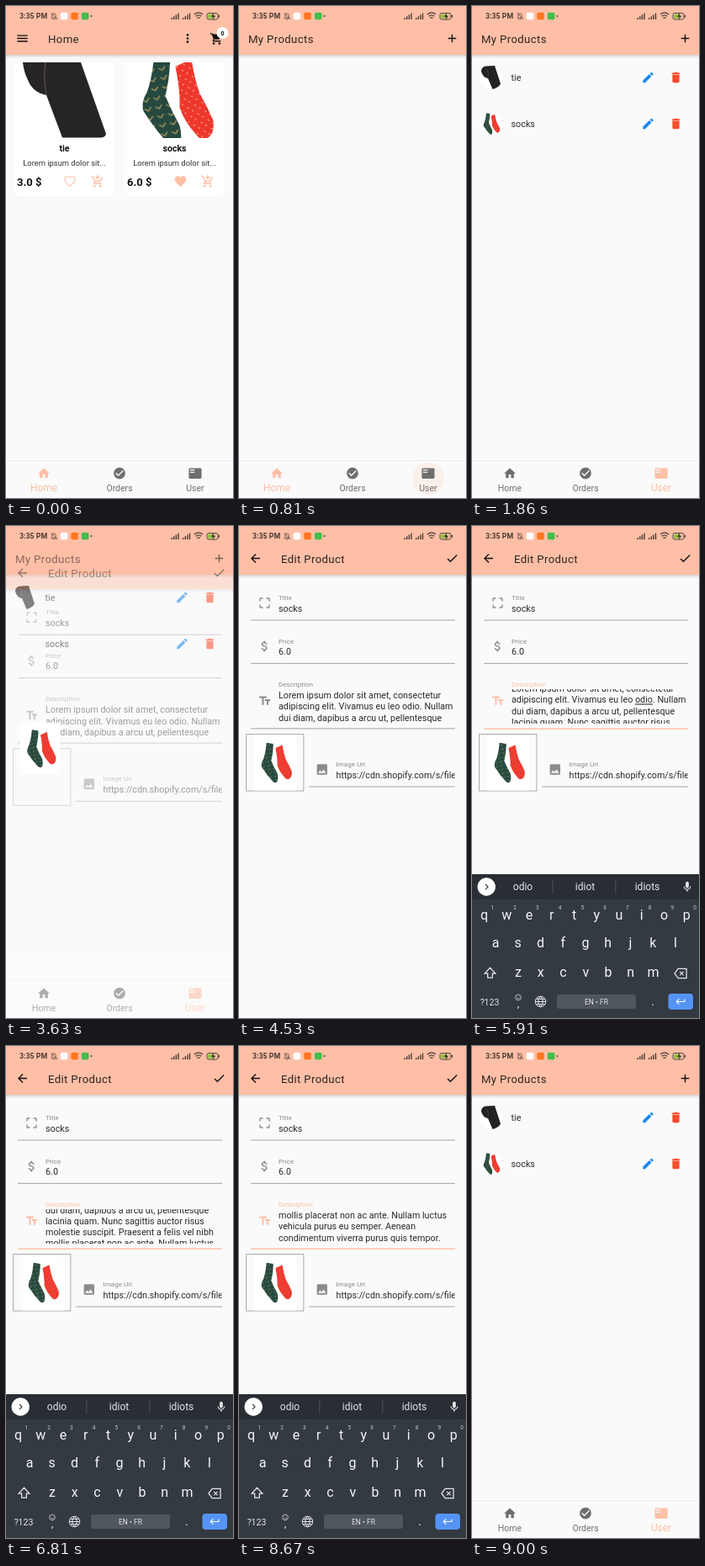
Write an HTML page that moves like this. It is 270x585 px and loops after 9240 ms.

```html
<!DOCTYPE html>
<html lang="en">
<head>
<meta charset="utf-8">
<title>Shop app</title>
<style>
html, body { margin: 0; width: 100%; height: 100%; overflow: hidden; background: #fafafa; }
#stage { display: block; width: 100vw; height: 100vh; font-family: Roboto, sans-serif; }
text { white-space: pre; }
</style>
</head>
<body>
<svg id="stage" viewBox="0 0 270 585"></svg>
<script>
const LOOP = 9240, PEACH = '#ffbfa6', GREY = '#6e6e6e', SOFT = '#8c8c8c', INK = '#2a2a2a', PALE = '#e4e6e8', STATUS = '#4a3b35';
const $ = id => document.getElementById(id);

// Icon outlines on a 24-unit grid
const ICONS = {
  menu: 'M3 18h18v-2H3zm0-5h18v-2H3zm0-7v2h18V6z',
  more: 'M12 8a2 2 0 1 0 0-4 2 2 0 0 0 0 4zm0 2a2 2 0 1 0 0 4 2 2 0 0 0 0-4zm0 6a2 2 0 1 0 0 4 2 2 0 0 0 0-4z',
  cart: 'M7 18a2 2 0 1 0 0 4 2 2 0 0 0 0-4zM1 2v2h2l3.6 7.59-1.35 2.45C4.5 15.4 5.5 17 7 17h12v-2H7.42c-.2 0-.3-.2-.22-.37L8.1 13h7.45c.75 0 1.41-.41 1.75-1.03l3.58-6.49A1 1 0 0 0 20 4H5.21l-.94-2zm16 16a2 2 0 1 0 0 4 2 2 0 0 0 0-4z',
  addCart: 'M11 9h2V6h3V4h-3V1h-2v3H8v2h3zm-4 9a2 2 0 1 0 0 4 2 2 0 0 0 0-4zm10 0a2 2 0 1 0 0 4 2 2 0 0 0 0-4zm-9.8-3.37L8.1 13h7.45c.75 0 1.41-.41 1.75-1.03l3.86-7.01L19.42 4l-3.87 7H8.53L4.27 2H1v2h2l3.6 7.59-1.35 2.45C4.5 15.4 5.5 17 7 17h12v-2H7.42c-.2 0-.3-.2-.22-.37z',
  heart: 'M12 21.35l-1.45-1.32C5.4 15.36 2 12.28 2 8.5 2 5.42 4.42 3 7.5 3c1.74 0 3.41.81 4.5 2.09C13.09 3.81 14.76 3 16.5 3 19.58 3 22 5.42 22 8.5c0 3.78-3.4 6.86-8.55 11.54z',
  home: 'M10 20v-6h4v6h5v-8h3L12 3 2 12h3v8z',
  done: 'M12 2a10 10 0 1 0 0 20 10 10 0 0 0 0-20zm-2 15l-5-5 1.41-1.41L10 14.17l7.59-7.59L19 8z',
  list: 'M21 3H3a2 2 0 0 0-2 2v14c0 1.1.9 2 2 2h18a2 2 0 0 0 2-2V5a2 2 0 0 0-2-2zm-10 8H3V9h8zm0-4H3V5h8z',
  edit: 'M3 17.25V21h3.75L17.81 9.94l-3.75-3.75zM20.71 7.04a1 1 0 0 0 0-1.41l-2.34-2.34a1 1 0 0 0-1.41 0l-1.83 1.83 3.75 3.75z',
  trash: 'M6 19c0 1.1.9 2 2 2h8a2 2 0 0 0 2-2V7H6zM19 4h-3.5l-1-1h-5l-1 1H5v2h14z',
  add: 'M19 13h-6v6h-2v-6H5v-2h6V5h2v6h6z',
  back: 'M20 11H7.83l5.59-5.59L12 4l-8 8 8 8 1.41-1.41L7.83 13H20z',
  check: 'M9 16.17L4.83 12l-1.42 1.41L9 19 21 7l-1.41-1.41z',
  frame: 'M3 5v4h2V5h4V3H5a2 2 0 0 0-2 2zm2 10H3v4c0 1.1.9 2 2 2h4v-2H5zm14 4h-4v2h4a2 2 0 0 0 2-2v-4h-2zm0-16h-4v2h4v4h2V5a2 2 0 0 0-2-2z',
  dollar: 'M11.8 10.9c-2.27-.59-3-1.2-3-2.15 0-1.09 1.01-1.85 2.7-1.85 1.78 0 2.44.85 2.5 2.1h2.21c-.07-1.72-1.12-3.3-3.21-3.81V3h-3v2.16c-1.94.42-3.5 1.68-3.5 3.61 0 2.31 1.91 3.46 4.7 4.13 2.5.6 3 1.48 3 2.41 0 .69-.49 1.79-2.7 1.79-2.06 0-2.87-.92-2.98-2.1h-2.2c.12 2.19 1.76 3.42 3.68 3.83V21h3v-2.15c1.95-.37 3.5-1.5 3.5-3.55 0-2.84-2.43-3.81-4.7-4.4z',
  type: 'M2.5 4v3h5v12h3V7h5V4zm19 5h-9v3h3v7h3v-7h3z',
  image: 'M21 19V5a2 2 0 0 0-2-2H5a2 2 0 0 0-2 2v14c0 1.1.9 2 2 2h14a2 2 0 0 0 2-2zM8.5 13.5l2.5 3.01L14.5 12l4.5 6H5z',
  left: 'M15.41 7.41L14 6l-6 6 6 6 1.41-1.41L10.83 12z',
  right: 'M10 6L8.59 7.41 13.17 12l-4.58 4.59L10 18l6-6z',
  mic: 'M12 14a3 3 0 0 0 3-3V5a3 3 0 0 0-6 0v6a3 3 0 0 0 3 3zm5.3-3c0 3-2.54 5.1-5.3 5.1S6.7 14 6.7 11H5c0 3.41 2.72 6.23 6 6.72V21h2v-3.28c3.28-.48 6-3.3 6-6.72z',
  enter: 'M19 7v4H5.83l3.58-3.59L8 6l-6 6 6 6 1.41-1.41L5.83 13H21V7z',
  shift: 'M12 3L3 13h5v7h8v-7h5z',
  erase: 'M22 4H8L2 12l6 8h14zM11 9l6 6m0-6l-6 6',
  globe: 'M2 12a10 10 0 1 0 20 0 10 10 0 1 0-20 0h20M12 2q-9 10 0 20 9-10 0-20M4 7h16M4 17h16',
  clip: 'M4 4h16v17H4zM9 2h6v4H9zM8 10h8M8 14h8M8 18h5',
  sticker: 'M4 3h16v12l-6 6H4zM20 15h-6v6M8 8v2m7-2v2M8 13q4 4 7 0',
  smile: 'M3 12a9 9 0 1 0 18 0 9 9 0 1 0-18 0M8 9v1m8-1v1M8 14q4 4 8 0',
  bell: 'M5 18h14l-2-3V10q0-5-5-5t-5 5v5zM10 21h4M4 3l17 18'
};
const place = (x, y, size) => `transform="translate(${x - size / 2} ${y - size / 2}) scale(${size / 24})"`;
const icon = (name, x, y, fill, size = 16.5) => `<path d="${ICONS[name]}" fill="${fill}" ${place(x, y, size)}/>`;
const line = (name, x, y, color, size = 16.5, w = 2) =>
  `<path d="${ICONS[name]}" fill="none" stroke="${color}" stroke-width="${w}" ${place(x, y, size)}/>`;
const rect = (x, y, w, h, fill, more = '') => `<rect x="${x}" y="${y}" width="${w}" height="${h}" fill="${fill}" ${more}/>`;
const dot = (x, y, r, fill) => `<circle cx="${x}" cy="${y}" r="${r}" fill="${fill}"/>`;
const text = (x, y, s, size, fill = INK, more = '') => `<text x="${x}" y="${y}" font-size="${size}" fill="${fill}" ${more}>${s}</text>`;
const MID = 'text-anchor="middle"', BOLD = 'font-weight="700"';

const bar = (title, x) => rect(0, 58, 270, 5, 'url(#shade)') + rect(0, 0, 270, 58, PEACH) +
  text(x, 43.6, title, 13.2, '#2b2522', 'letter-spacing=".35"');
const socks = (x, y, w, h, more = '') =>
  `<svg x="${x}" y="${y}" width="${w}" height="${h}" viewBox="-59.5 -78.5 119 157" preserveAspectRatio="xMidYMid slice" ${more}>
  ${rect(-60, -200, 120, 400, '#fff')}<use href="#socks"/></svg>`;

const defs = `<defs>
<linearGradient id="shade" x2="0" y2="1"><stop stop-opacity=".16"/><stop offset=".5" stop-opacity=".05"/><stop offset="1" stop-opacity="0"/></linearGradient>
<pattern id="birds" width="13" height="11" patternUnits="userSpaceOnUse" patternTransform="rotate(-12)">
${rect(0, 0, 13, 11, '#25493f')}<path d="M2 3l4 3 4-4" fill="none" stroke="#a8945a" stroke-width="1.4"/></pattern>
<pattern id="specks" width="9" height="11" patternUnits="userSpaceOnUse" patternTransform="rotate(-20)">
${rect(0, 0, 9, 11, '#ee372c')}<path d="M2 2l2 2M7 7v2" stroke="#f6cfc0"/></pattern>
<g id="socks"><path fill="url(#birds)" d="M-24-55L-5-52Q-6-24-11-5-4 12 6 30 10 46 5 54-3 58-8 51-23 35-37 13-40 2-33-9-27-24-24-55Z"/>
<path fill="url(#specks)" d="M1-40L20-49Q24-24 30-8 39 8 46 24 48 40 39 45 31 49 25 40 12 26 6 9 7-10 1-40Z"/></g>
<clipPath id="disc"><circle cx="22.5" cy="140" r="13.75"/></clipPath>
</defs>`;

const card = (x, name, price, picture, heart) =>
  rect(x, 67.8, 119, 160, '#000', 'rx="7" opacity=".035"') + rect(x, 67, 119, 160, '#fff', 'rx="7"') + picture +
  text(x + 59.5, 172.8, name, 10.6, '#111', MID + BOLD) +
  text(x + 59.5, 190, 'Lorem ipsum dolor sit...', 9.4, '#333', MID) +
  text(x + 3, 213.7, price, 13, '#111', BOLD) + heart + icon('addCart', x + 98.8, 208.5, PEACH);

const tie = `<path fill="#272425" d="M20 67H89L119 152Q118 156.500 112 156.500H67L48 106Q32 103 26 88 21 78 20 67Z"/>
<path fill="none" stroke="#625d5d" d="M47 67Q44 86 48 106"/>`;

const homePage = bar('Home', 50) + icon('menu', 19.5, 38.5, '#111') + icon('more', 216, 38.5, '#111') +
  icon('cart', 250.5, 39, '#111') + dot(257.5, 32, 7, '#fff') + text(257.5, 34.6, '0', 7, '#111', MID + BOLD) +
  card(10, 'tie', '3.0 $', tie, line('heart', 76, 208.5, PEACH, 15.2, 1.8)) +
  card(141, 'socks', '6.0 $', socks(141, 67, 119, 90), icon('heart', 207.5, 208.5, PEACH));

const row = (y, name) => text(46.5, y + 4, name, 10.8) + icon('edit', 209.5, y, '#1689ee') + icon('trash', 242.5, y, '#fb4b2d');
const listPage = bar('My Products', 11) + icon('add', 253.5, 38.5, '#111') +
  `<path id="spinner" fill="none" stroke="${PEACH}" stroke-width="2.75"/>
  <g id="rows">${row(85, 'tie')}${row(140, 'socks')}</g>
  <g id="thumbs">${dot(22.5, 85, 13.75, '#fff')}
  <path fill="#232121" d="M11 78Q11 72 17 71.500L27 71 34 92.500Q32 96.500 24.500 99L19 86Q13 85 11 78Z"/>
  <path d="M16 74q4 3 3 9" fill="none" stroke="#555" stroke-width=".6"/></g>
  <g id="thumb" clip-path="url(#disc)">${socks(8.75, 126.25, 27.5, 27.5)}</g>`;

const words = ['Lorem ipsum dolor sit amet, consectetur',
  'adipiscing elit. Vivamus eu leo <tspan id="odio">odio</tspan>. Nullam',
  'dui diam, dapibus a arcu ut, pellentesque', 'lacinia quam. Nunc sagittis auctor risus',
  'molestie suscipit. Praesent a felis vel nibh', 'mollis placerat non ac ante. Nullam luctus',
  'vehicula purus eu semper. Aenean', 'condimentum viverra purus quis tempor.'];
const label = (x, y, s, fill = SOFT) => text(x, y, s, 8.1, fill);
const rule = (x, y) => rect(x, y - .4, 257 - x, .8, '#8f8f8f');

const editPage = rect(0, 0, 270, 585, '#fafafa') + bar('Edit Product', 50) +
  icon('back', 19.5, 38.5, '#111') + icon('check', 253.5, 38.5, '#111') +
  icon('frame', 30.5, 91.5, SOFT) + label(47, 88.3, 'Title') + text(47, 101.8, 'socks', 10.75) + rule(14, 112) +
  icon('dollar', 30.5, 143, SOFT) + label(47, 139.5, 'Price') + text(47, 153, '6.0', 10.75) + rule(14, 163.3) +
  `<g id="focus">${icon('type', 30.5, 208, 'inherit')}${label(47, 191.3, 'Description', 'inherit')}
  <rect id="focusRule" x="14" y="240.5" width="243"/></g>
  <svg x="47" y="194" width="210" height="41" viewBox="47 194 210 41"><g id="scroll">
  ${words.map((s, i) => text(47, 205.3 + i * 13.1, s, 10.75)).join('')}${rect(203.3, 207.5, 1.4, 13.5, '#3a7fc4', 'id="caret"')}</g></svg>
  <path id="handle" fill="#58a9f6" d="M203.7 219.8l5.3 5.4a7.5 7.5 0 1 1-10.6 0z"/>` +
  rect(8.6, 247.5, 68.3, 67.5, 'none', 'stroke="#999" stroke-width=".8"') +
  icon('image', 98.8, 289.5, SOFT) + label(115.5, 286, 'Image Url') + rule(83, 310) +
  `<svg x="115" y="284" width="141.5" height="22" viewBox="115 284 141.5 22">${text(115.5, 299.8, 'https://cdn.shopify.com/s/files/', 10.75)}</svg>`;

const keys = (s, x, y) => [...s].map((c, i) => text(x + i * 26.75, y, c, 16, '#f4f5f6', MID)).join('');
const keyboard = rect(0, 414, 270, 172, '#343a42') + rect(0, 414, 270, 30, '#292e35') +
  dot(17.2, 429, 10.7, '#fff') + icon('mic', 256, 429, PALE, 15) +
  `<g id="tools">${icon('left', 17, 429, '#333', 14)}${line('sticker', 53, 429, PALE, 13)}
  ${text(91, 432.6, 'GIF', 9.5, PALE, MID + BOLD)}${line('clip', 130.5, 429, PALE, 13)}
  <g fill="none" stroke="${PALE}"><circle cx="169" cy="429" r="3.3" stroke-width="2"/>
  <circle cx="169" cy="429" r="5" stroke-width="1.8" stroke-dasharray="1.96"/></g>
  ${rect(193.5, 422, .8, 14, '#555b63')}<g transform="rotate(90 217 429)">${icon('more', 217, 429, PALE, 15)}</g></g>
  <g id="hints">${icon('right', 17.5, 429, '#333', 14)}${rect(95.5, 421, .8, 16, '#555b63')}${rect(170.5, 421, .8, 16, '#555b63')}
  ${['odio', 'idiot', 'idiots'].map((s, i) => text(60.5 + i * 74, 433.2, s, 12, PALE, MID)).join('')}</g>` +
  keys('qwertyuiop', 14.5, 467.5) + keys('asdfghjkl', 28, 501.3) + keys('zxcvbnm', 55, 535.5) +
  [...'1234567890'].map((c, i) => text(24.3 + i * 26.75, 455.5, c, 6.5, '#c4c8cc', MID)).join('') +
  line('shift', 21.5, 531.5, PALE, 17, 1.8) + line('erase', 248, 532, PALE, 17, 1.8) +
  text(21, 569.5, '?123', 10.5, PALE, MID) + line('smile', 55, 560.5, PALE, 9) + text(55, 572, ',', 13, PALE, MID) +
  line('globe', 81.5, 565.5, PALE, 15, 1.6) + rect(101, 557, 94, 17, '#50565e', 'rx="3"') +
  text(148, 568.7, 'EN • FR', 8.5, PALE, MID) + text(215, 570, '.', 15, PALE, MID) +
  rect(233.5, 556, 29.5, 19, '#5594f5', 'rx="4"') + icon('enter', 248.3, 565.5, '#fff', 14);

const bars = x => [0, 1, 2, 3].map(i => rect(x + i * 2.6, 14 - i * 1.8, 1.4, 2 + i * 1.8, STATUS)).join('');
const status = text(16, 15.3, '3:35 PM', 8.8, STATUS, BOLD) + line('bell', 57, 12, STATUS, 10.5, 1.7) +
  ['#fff', '#ff7620', '#43bd4b'].map((c, i) => rect(64.7 + i * 12.6, 7.7, 8.6, 8.6, c, 'rx="2"')).join('') + dot(101.5, 12, 1, STATUS) +
  bars(196.5) + bars(210) +
  `<g fill="none" stroke="${STATUS}" stroke-width="1.3"><path d="M224 10q5-4.2 10 0M225.7 12.3q3.3-2.8 6.600 0M227.4 14.4q1.6-1.2 3.2 0"/>
  <rect x="239" y="8.5" width="13" height="7.5" rx="2" stroke-width=".9"/></g>` +
  rect(240.3, 9.8, 6, 5, '#8ec63f') + rect(252.6, 10.7, 1.4, 3, STATUS) + `<path d="M247 8l-3 5h2.5l-1 4 4-5.500h-2.500z" fill="${STATUS}"/>`;

$('stage').innerHTML = defs + rect(0, 0, 270, 585, '#fafafa') + `<g id="home">${homePage}</g><g id="list">${listPage}</g>
<svg y="540" width="270" height="45" viewBox="0 540 270 45">${rect(0, 540, 270, 45, '#fafafa')}${rect(0, 540, 270, .8, '#ececec')}
<circle id="ripple" cx="225" cy="562" fill="${PEACH}"/><g id="nav"></g></svg>
<g id="edit">${editPage}</g>${socks(0, 0, 1, 1, 'id="hero"')}<g id="keyboard">${keyboard}</g>${status}`;

const clamp = v => Math.min(1, Math.max(0, v));
const span = (t, a, b) => clamp((t - a) / (b - a));
const lerp = (a, b, k) => a + (b - a) * k;
const smooth = k => k * k * (3 - 2 * k);
function bezier(x1, y1, x2, y2) {
  const at = (a, b, s) => 3 * a * s * (1 - s) ** 2 + 3 * b * s * s * (1 - s) + s ** 3;
  return x => {
    let lo = 0, hi = 1;
    for (let i = 0; i < 24; i++) {
      const m = (lo + hi) / 2;
      if (at(x1, x2, m) < x) lo = m; else hi = m;
    }
    return x <= 0 ? 0 : x >= 1 ? 1 : at(y1, y2, lo);
  };
}
const standard = bezier(.4, 0, .2, 1), easeIn = bezier(.42, 0, 1, 1);
const set = (id, attrs) => { for (const k in attrs) $(id).setAttribute(k, attrs[k]); };
const show = (id, on) => set(id, { display: on ? 'inline' : 'none' });

function tab(name, glyph, x, k) {
  const color = `rgb(${lerp(110, 255, k)},${lerp(110, 191, k)},${lerp(110, 166, k)})`;
  return icon(glyph, x, 555.7, color) + text(x, 576.8, name, lerp(10.5, 11.9, k), color, MID);
}

function spinnerPath(ms) {
  const cycle = ms / 1333 % 1, head = standard(span(cycle, 0, .5)), tail = standard(span(cycle, .5, 1));
  const from = Math.PI * (-.5 + tail * 1.5 + ms / 2222 * 2 + cycle * .5);
  const sweep = Math.max(Math.PI * 1.5 * (head - tail), .02);
  const point = a => `${135 + 12.4 * Math.cos(a)} ${299 + 12.4 * Math.sin(a)}`;
  return `M${point(from)}A12.4 12.4 0 ${sweep > Math.PI ? 1 : 0} 1 ${point(from + sweep)}`;
}

function draw(t) {
  const TAP = 800, user = t >= TAP;
  show('home', !user);
  show('list', user);
  show('spinner', t < 1680);
  show('rows', t >= 1680);
  show('thumbs', t >= 1710);
  if (user && t < 1680) set('spinner', { d: spinnerPath(t - TAP) });

  const picked = standard(span(t, TAP, TAP + 200));
  $('nav').innerHTML = tab('Home', 'home', 45, 1 - picked) + tab('Orders', 'done', 135, 0) + tab('User', 'list', 225, picked);
  set('ripple', {
    r: 24 * span(t, 280, 1000) + 26 * span(t, TAP, 1000),
    opacity: .2 * span(t, 280, 360) * (1 - span(t, TAP, 1200))
  });

  // Page fades upward in, and leaves the same way
  const closing = t > 8000;
  const k = closing ? 1 - span(t, 8690, 8990) : span(t, 3465, 3738);
  show('edit', k > 0);
  set('edit', { opacity: easeIn(k), transform: `translate(0 ${146 * (1 - standard(k))})` });
  const fly = closing ? 1 - standard(1 - k) : standard(k);
  show('hero', k > 0);
  show('thumb', k === 0 && t >= 1710);
  set('hero', { x: lerp(8.75, 17.5, fly), y: lerp(126.25, 248, fly), width: lerp(27.5, 51, fly), height: lerp(27.5, 66.5, fly) });

  const focused = t >= 5130;
  set('focus', { fill: focused ? PEACH : SOFT });
  set('focusRule', { height: focused ? 1.4 : .8 });
  set('odio', { 'text-decoration': focused ? 'underline' : 'none' });
  show('caret', focused && t < 5910);
  show('handle', focused && t < 5700);
  const scroll = 8 * smooth(span(t, 5670, 5730)) + 23 * smooth(span(t, 6300, 6540)) + 34.5 * smooth(span(t, 6780, 7020));
  set('scroll', { transform: `translate(0 ${-scroll})` });

  const drop = (1 - span(t, 5160, 5400)) ** 2.3 + span(t, 8680, 8880) ** 2;
  show('keyboard', drop < 1);
  set('keyboard', { transform: `translate(0 ${171 * drop})` });
  show('tools', t < 5430);
  show('hints', t >= 5430);
}

function tick() {
  draw(performance.now() % LOOP);
  requestAnimationFrame(tick);
}
tick();
</script>
</body>
</html>
```
